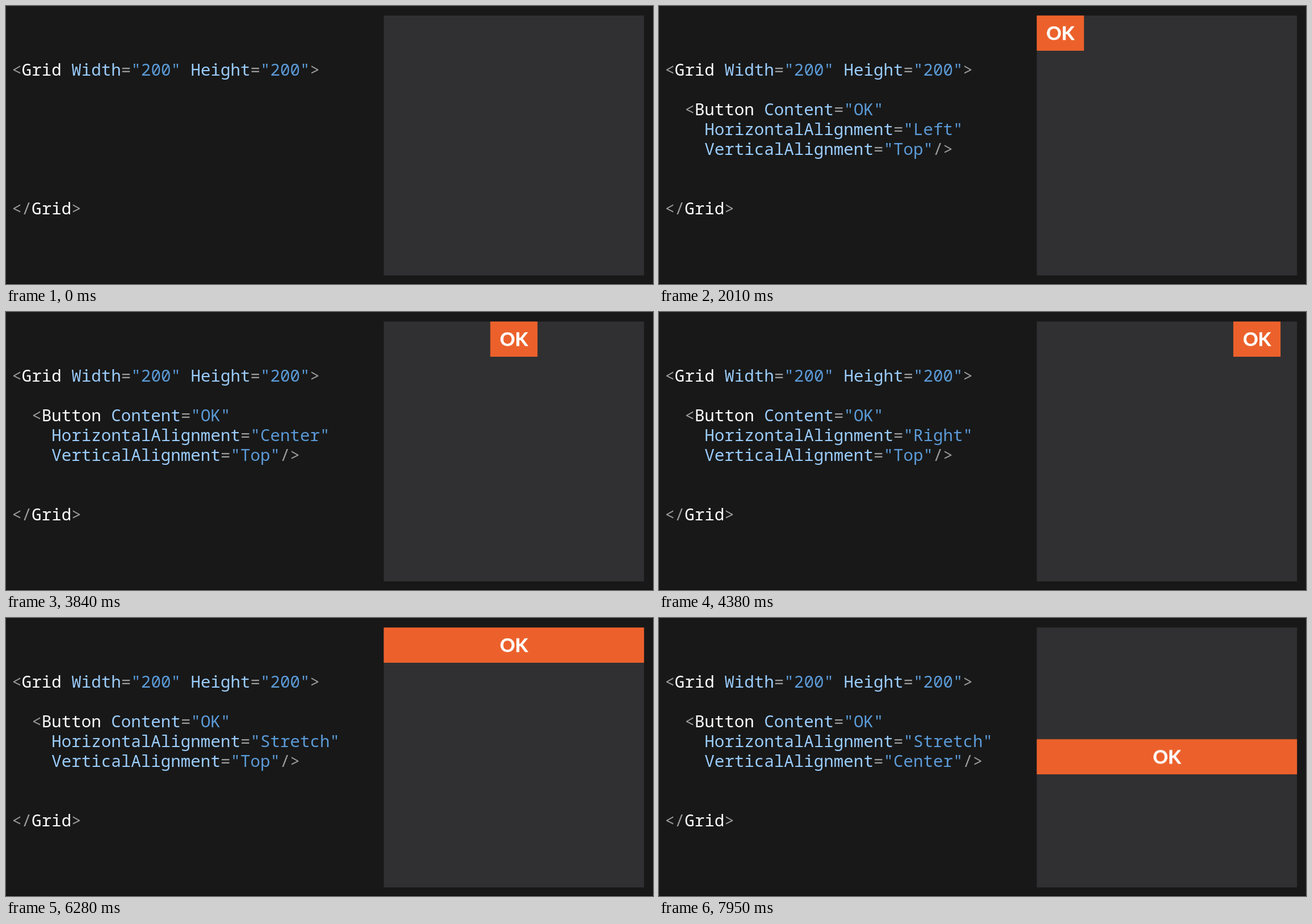
These frames come from a looping animation (1140x491 px, 8 s). An HTML page:

```html
<!DOCTYPE html>
<html lang="en">
<head>
<meta charset="utf-8">
<title>Button alignment</title>
<style>
  html, body { margin: 0; width: 100%; height: 100%; overflow: hidden; background: #181818; }
  svg { display: block; width: 1140px; height: 491px; }
  .code text { font: 29.2px "Roboto Mono", "Noto Sans Mono", "DejaVu Sans Mono", monospace; fill: #9b9b9b; }
  .code .tag { fill: #fff; }
  .code .attr { fill: #9bcdfd; }
  .code .val { fill: #5b9bd8; }

  .button, .label, .snippet, .value {
    animation: 8s linear infinite;
  }

  /* Code changes cross-fade over 220 ms; the button follows. */
  .snippet { animation-name: snippet; }
  .left { animation-name: left; }
  .center { animation-name: center; }
  .right { animation-name: right; }
  .stretch { animation-name: stretch; }
  .top { animation-name: top; }
  .middle { animation-name: middle; }
  @keyframes snippet { 0%, 3.75% { opacity: 0 } 6.5%, 100% { opacity: 1 } }
  @keyframes left { 0%, 25.125% { opacity: 1 } 27.875%, 100% { opacity: 0 } }
  @keyframes center { 0%, 25.125% { opacity: 0 } 27.875%, 48% { opacity: 1 } 50.75%, 100% { opacity: 0 } }
  @keyframes right { 0%, 48% { opacity: 0 } 50.75%, 70.625% { opacity: 1 } 73.375%, 100% { opacity: 0 } }
  @keyframes stretch { 0%, 70.625% { opacity: 0 } 73.375%, 100% { opacity: 1 } }
  @keyframes top { 0%, 91% { opacity: 1 } 93.75%, 100% { opacity: 0 } }
  @keyframes middle { 0%, 91% { opacity: 0 } 93.75%, 100% { opacity: 1 } }

  .button { animation-name: appear, drop; animation-timing-function: linear, cubic-bezier(.65, 0, .35, 1); }
  .box, .label { animation: 8s cubic-bezier(.65, 0, .35, 1) infinite; }
  .box { fill: #ec612b; animation-name: box; }
  .label { animation-name: label; }
  .label text { font: 700 33px Lato, sans-serif; fill: #fff; stroke: #fff; stroke-width: .5px; text-anchor: middle; }
  @keyframes appear { 0%, 6.4125% { opacity: 0 } 12.6625%, 100% { opacity: 1 } }
  @keyframes drop {
    0%, 93.625% { transform: translateY(0) }
    99.875%, 100% { transform: translateY(198.3px) }
  }
  @keyframes box {
    0%, 27.75% { x: 665.6px; width: 83.2px }
    34%, 50.625% { x: 853.3px; width: 83.2px }
    56.875%, 73% { x: 1041px; width: 83.2px }
    78.5%, 100% { x: 665.6px; width: 458.6px }
  }
  @keyframes label {
    0%, 27.75% { transform: translateX(707.2px) }
    34%, 50.625% { transform: translateX(895px) }
    56.875%, 73% { transform: translateX(1082.6px) }
    78.5%, 100% { transform: translateX(895px) }
  }
</style>
</head>
<body>
<svg viewBox="0 0 1140 491">
  <rect width="1140" height="491" fill="#181818"/>
  <rect y="490" width="1140" height="1" fill="#0c0c0c"/>
  <rect x="665.6" y="16.8" width="458.6" height="459" fill="#303032"/>

  <g class="code">
    <text x="10.2" y="122.5">&lt;<tspan class="tag">Grid</tspan> <tspan class="attr">Width</tspan>=<tspan class="val">"200"</tspan> <tspan class="attr">Height</tspan>=<tspan class="val">"200"</tspan>&gt;</text>
    <g class="snippet">
      <text x="45.2" y="192.5">&lt;<tspan class="tag">Button</tspan> <tspan class="attr">Content</tspan>=<tspan class="val">"OK"</tspan></text>
      <text x="80.2" y="227.5"><tspan class="attr">HorizontalAlignment</tspan>=<tspan class="val">"</tspan></text>
      <g class="value left"><text class="val" x="448" y="227.5">Left"</text></g>
      <g class="value center"><text class="val" x="448" y="227.5">Center"</text></g>
      <g class="value right"><text class="val" x="448" y="227.5">Right"</text></g>
      <g class="value stretch"><text class="val" x="448" y="227.5">Stretch"</text></g>
      <text x="80.2" y="262.5"><tspan class="attr">VerticalAlignment</tspan>=<tspan class="val">"</tspan></text>
      <g class="value top"><text x="413" y="262.5"><tspan class="val">Top"</tspan>/&gt;</text></g>
      <g class="value middle"><text x="413" y="262.5"><tspan class="val">Center"</tspan>/&gt;</text></g>
    </g>
    <text x="10.2" y="367.5">&lt;/<tspan class="tag">Grid</tspan>&gt;</text>
  </g>

  <g class="button">
    <rect class="box" y="16.8" height="62.2"/>
    <g class="label"><text y="60">OK</text></g>
  </g>
</svg>
</body>
</html>
```
